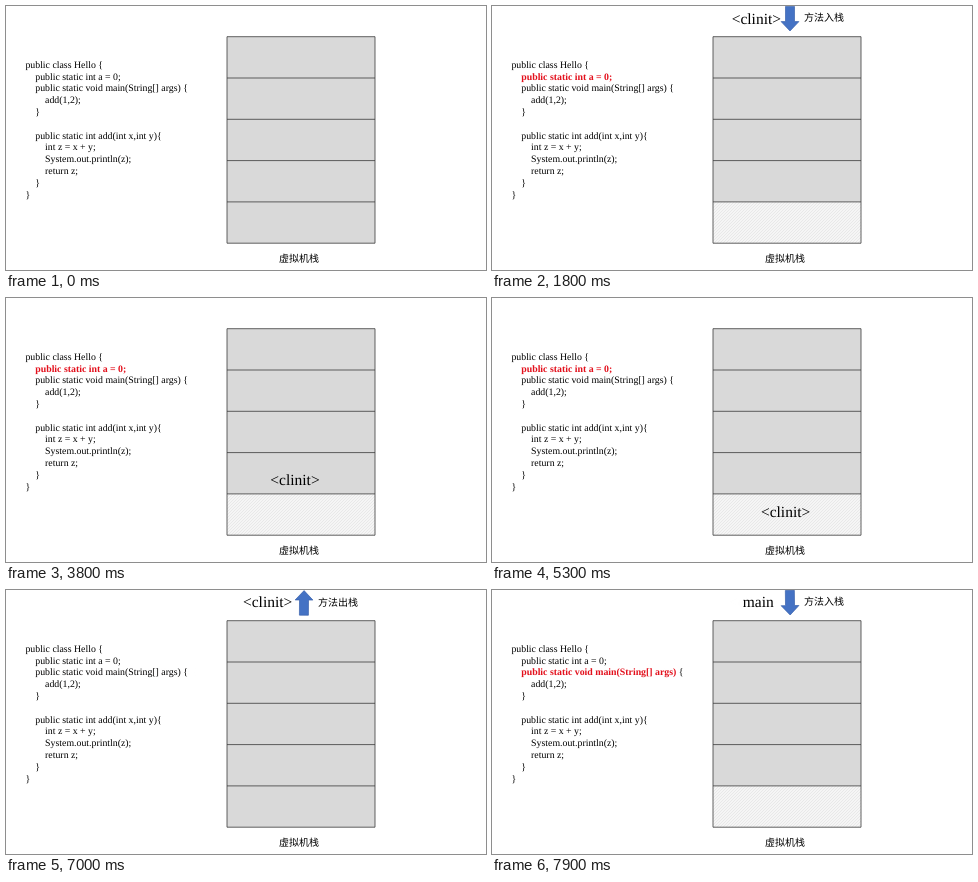
An HTML page that plays this animation: 480x264 px, repeating every 8000 ms.

```html
<!DOCTYPE html>
<html lang="zh">
<head>
<meta charset="utf-8">
<style>
  html, body { margin: 0; width: 100%; height: 100%; overflow: hidden; background: #fff; }
  svg { display: block; width: 100vw; height: 100vh; }
  text { white-space: pre; text-rendering: geometricPrecision; }
  .code { font: 9.84px "Liberation Serif", "Times New Roman", serif; }
  .method { font: 15.5px "Liberation Serif", "Times New Roman", serif; }
  .label { font: 10px "Noto Sans CJK SC", "Noto Sans CJK", sans-serif; }
  .active { font-weight: bold; fill: #e3101c; }
</style>
</head>
<body>
<svg viewBox="0 0 480 264">
  <defs>
    <pattern id="stripes" width="3" height="3" patternUnits="userSpaceOnUse">
      <rect width="3" height="3" fill="#f5f5f5"/>
      <path d="M-1 1L1 -1M0 3L3 0M2 4L4 2" stroke="#e5e5e5" stroke-width=".8"/>
    </pattern>
  </defs>
  <rect x="221" y="30.7" width="148" height="206.5" fill="#d9d9d9"/>
  <rect id="hatch" x="221" y="195.9" width="148" height="41.3" fill="url(#stripes)"/>
  <path d="M221 30.7h148v206.5h-148zM221 72h148M221 113.3h148M221 154.6h148M221 195.9h148"
        fill="none" stroke="#3c3c3c" stroke-width=".8"/>
  <text class="label" x="273" y="256.4">虚拟机栈</text>
  <g id="code" class="code"></g>
  <text id="clinit" class="method">&lt;clinit&gt;</text>
  <text id="main" class="method" x="250.8" y="17.4">main</text>
  <path id="arrow" d="M293.5 .4h9v15.2h4.4L298 25l-8.9 -9.4h4.4z"
        fill="#4472c4" stroke="#3a62ac" stroke-width=".7"/>
  <text id="push" class="label" x="312" y="15.4">方法入栈</text>
  <text id="pop" class="label" x="312" y="16">方法出栈</text>
</svg>
<script>
const LOOP = 8000, MORPH = 960;
const STARTS = [825, 3225, 5300, 7000];
const byId = id => document.getElementById(id);

const lines = [
  'public class Hello {',
  '    public static int a = 0;',
  '    public static void main(String[] args) {',
  '        add(1,2);',
  '    }',
  '',
  '    public static int add(int x,int y){',
  '        int z = x + y;',
  '        System.out.println(z);',
  '        return z;',
  '    }',
  '}'
];

function codeLine(row, active) {
  const indent = lines[row].search(/\S|$/);
  const content = lines[row].trim();
  const body = active ? content.replace(/ {$/, '') : content;
  const text = document.createElementNS('http://www.w3.org/2000/svg', 'text');
  text.setAttribute('x', 19.4 + indent * 2.46);
  text.setAttribute('y', 61.8 + row * 11.8);
  const span = document.createElementNS('http://www.w3.org/2000/svg', 'tspan');
  span.textContent = body;
  if (active) span.setAttribute('class', 'active');
  text.append(span, content.slice(body.length));
  byId('code').append(text);
  return text;
}

const plain = lines.map((_, row) => codeLine(row, false));
const active = { 1: codeLine(1, true), 2: codeLine(2, true) };

const clamp = v => Math.min(1, Math.max(0, v));
const mix = (a, b, k) => a + (b - a) * k;
const ease = p => 1 - (1 - p) ** 2;
const fadeIn = p => clamp((p - .25) / .65);
const fadeOut = p => clamp(1 - 2 * p);
const show = (el, opacity) => el.setAttribute('opacity', opacity);

function highlight(row, amount) {
  show(plain[row], clamp(2 - 2 * amount));
  show(active[row], amount);
}

function draw(t) {
  const p = STARTS.map(start => clamp((t - start) / MORPH));
  const [enter, drop, leave, next] = p.map(ease);
  const entering = fadeIn(p[0]) * fadeOut(p[1]);
  const leaving = fadeIn(p[2]);

  highlight(1, enter - leave);
  highlight(2, next);
  show(byId('hatch'), (enter - leave + next) ** 2);

  const clinit = byId('clinit');
  clinit.setAttribute('x', mix(mix(239.7, 269, drop), 237, leave));
  clinit.setAttribute('y', mix(mix(17.9, 219.7, drop), 17.2, leave));
  show(clinit, fadeIn(p[0]) * (1 - next));
  show(byId('main'), next);

  const angle = p[2] > 0 ? 180 + 180 * next : 0;
  byId('arrow').setAttribute('transform', `rotate(${angle} 298 12.8)`);
  show(byId('arrow'), p[2] > 0 ? leaving : entering);
  show(byId('push'), Math.max(entering, next));
  show(byId('pop'), leaving * (1 - next));
}

const began = performance.now();
function tick() {
  draw((performance.now() - began) % LOOP);
  requestAnimationFrame(tick);
}
tick();
</script>
</body>
</html>
```
